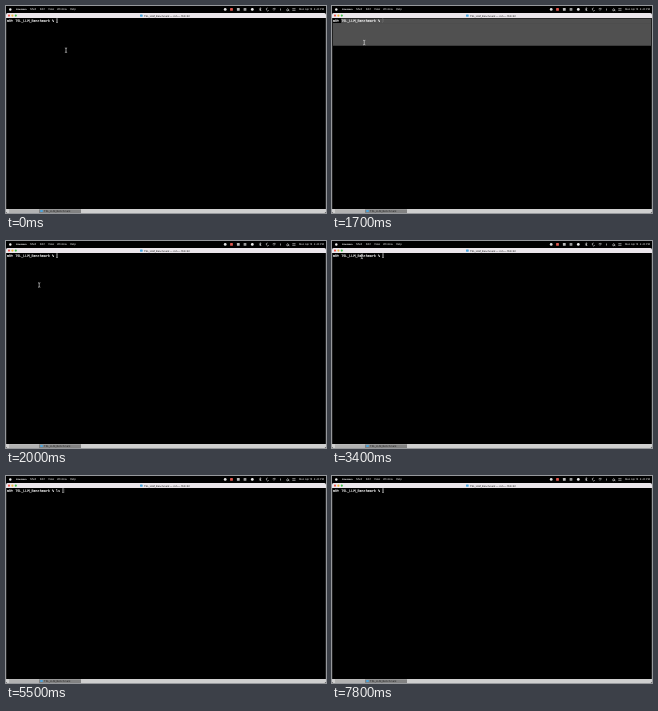
These frames come from a looping animation (320 by 207 pixels, 8000 ms). An HTML page:

```html
<!DOCTYPE html>
<html lang="en">
<head>
<meta charset="utf-8">
<title>Shell session</title>
<style>
  html, body { margin: 0; width: 100%; height: 100%; overflow: hidden; background: #000; }
  svg { display: block; width: 100%; height: 100%; }
  text { text-rendering: geometricPrecision; white-space: pre; }
  .ui { font-family: Inter, "Open Sans", sans-serif; font-size: 2.7px; fill: #eee; }
  .mono { font-family: "DejaVu Sans Mono", monospace; font-size: 3.405px; fill: #fff; stroke: #fff; stroke-width: .1; }
  .title { font-size: 2.45px; font-weight: 600; fill: #444; }
  .tab { font-size: 2.6px; fill: #222; }
</style>
</head>
<body>
<svg viewBox="0 0 320 207" preserveAspectRatio="none">
  <rect width="320" height="207" fill="#000"/>

  <g class="ui">
    <circle cx="4.3" cy="3.5" r="1.2"/>
    <text x="10" y="4.4" font-weight="700" font-size="2.3" fill="#fff">Lineroom</text>
    <text x="24" y="4.4">Shell</text>
    <text x="34" y="4.4">Edit</text>
    <text x="42" y="4.4">View</text>
    <text x="51" y="4.4" font-size="2.6">Window</text>
    <text x="64" y="4.4">Help</text>
    <text x="293" y="4.4" font-size="2.5">Mon Apr 13  4:40 PM</text>
  </g>
  <g id="status"></g>

  <path d="M0 12V8.6Q0 7 1.6 7H318.4Q320 7 320 8.6V12Z" fill="#ebe6eb"/>
  <circle cx="3" cy="9.6" r="1.05" fill="#f4564e"/>
  <circle cx="6.4" cy="9.6" r="1.05" fill="#f2b83a"/>
  <circle cx="9.8" cy="9.6" r="1.05" fill="#3fc04a"/>
  <rect x="134" y="8.5" width="2.7" height="2.2" rx=".4" fill="#4ba6df"/>
  <text class="ui title" x="138" y="10.5">TSL_LLM_Benchmark — zsh — 153×42</text>

  <g id="selection" fill="#505050"></g>
  <rect id="caret" y="12.8" width="1.5" height="4" fill="#333" stroke="#aaa" stroke-width=".4"/>
  <text id="line" class="mono" x="1" y="16"></text>

  <path d="M.3 12V203M319.7 12V203" stroke="#444" stroke-width=".6"/>
  <path d="M0 203H320V205.4Q320 207 318.4 207H1.6Q0 207 0 205.4Z" fill="#cfcfcf"/>
  <rect x="3" y="203.3" width="30" height="3.7" fill="#b2b2b2"/>
  <rect x="33" y="203.3" width="42" height="3.7" fill="#828282"/>
  <rect x="34.2" y="204" width="2.6" height="2" rx=".4" fill="#4ba6df"/>
  <text class="ui tab" x="38" y="206">TSL_LLM_Benchmark</text>

  <path id="mouse" d="M-1.1 -2.3Q0 -2.3 0 -1.5Q0 -2.3 1.1 -2.3M0 -1.5V1.5M-1.1 2.3Q0 2.3 0 1.5Q0 2.3 1.1 2.3"
        fill="none" stroke="#ddd" stroke-width=".65"/>
</svg>
<script>
const LOOP = 8000, STEP = 100;
const LEFT = 1, CHAR = 2.05, TOP = 12.5, ROW = 4.54;
const PROMPT = 'mRt TSL_LLM_Benchmark % ';
const WORD = { from: LEFT + 4 * CHAR, to: LEFT + 21 * CHAR };

// [time, x, y]: the pointer glides between neighbouring stops
const PATH = [
  [0, 60, 44.2], [100, 40.5, 21.5], [200, 40.5, 21.5], [1100, 33.5, 16.5],
  [1300, 29.5, 15.3], [1500, 29.5, 15.3], [1800, 33.2, 44], [2100, 33.2, 44],
  [2600, 39.6, 22], [3100, 39.6, 22], [3400, 29.8, 15.4], [4300, 29.8, 15.4],
  [4500, 42.4, 22.4], [5300, 42.4, 22.4]
];
// [time, typed text]
const TYPED = [[0, ''], [5300, 'ls'], [5500, 'ls '], [7600, 'ls'], [7700, 'l'], [7800, '']];

const $ = id => document.getElementById(id);
const rect = (x, y, w, h, more = '') =>
  `<rect x="${x}" y="${y}" width="${w}" height="${h}" ${more}/>`;

function drawStatus() {
  const dot = (x, fill) => `<circle cx="${x}" cy="3.4" r="1.4" fill="${fill}"/>`;
  const box = (x, fill) => rect(x - 1.4, 2.1, 2.8, 2.6, `rx=".5" fill="${fill}"`);
  const lines = d => `<path d="${d}" fill="none" stroke="#ddd" stroke-width=".6"/>`;
  $('status').innerHTML =
    dot(219.2, '#ddd') + box(225.5, '#e0584f') + box(232.3, '#bbb') +
    box(239, '#999') + dot(246.3, '#eee') +
    lines('M253.5 2.7L255 4.2L254.2 5V1.8L255 2.6L253.5 4.1') +
    lines('M261.6 2A1.4 1.4 0 1 0 262.8 4.3') +
    lines('M266.6 3Q268.2 1.7 269.8 3M267.4 4Q268.2 3.4 269 4') +
    lines('M274.5 2.5V4.5') +
    lines('M282.5 3.2A1 1 0 1 1 282.4 3.1M282.4 4L283.3 4.8') +
    lines('M286.3 2.7H289.5M286.3 4.3H289.5');
}

function pointerAt(t) {
  const i = PATH.findIndex(p => p[0] > t);
  if (i < 0) return PATH[PATH.length - 1].slice(1);
  const [t0, x0, y0] = PATH[i - 1], [t1, x1, y1] = PATH[i];
  const k = (t - t0) / (t1 - t0), e = k * k * (3 - 2 * k);
  return [x0 + (x1 - x0) * e, y0 + (y1 - y0) * e];
}

function selectionAt(t, y) {
  const word = rect(WORD.from, TOP, WORD.to - WORD.from, 4.4);
  if (t >= 4100 && t < 4700 || t >= 1300 && t < 1600) return word;
  if (t < 1600 || t >= 2000) return '';
  const rows = Math.ceil((y - TOP) / ROW);
  if (rows < 2) return word;
  return rect(WORD.from, TOP, 319 - WORD.from, ROW) +
    rect(1, TOP + ROW, 318, (rows - 1) * ROW);
}

function render(now) {
  const t = Math.floor(now % LOOP / STEP) * STEP;
  const [x, y] = pointerAt(t);
  const typed = TYPED.filter(s => s[0] <= t).pop()[1];
  $('line').textContent = PROMPT + typed;
  $('caret').setAttribute('x', LEFT + .1 + (PROMPT.length + typed.length) * CHAR);
  $('caret').setAttribute('opacity', t >= 1600 && t < 2000 ? .55 : 1);
  $('selection').innerHTML = selectionAt(t, y);
  $('mouse').setAttribute('transform', `translate(${x} ${y})`);
  $('mouse').setAttribute('visibility', t < 5300 ? 'visible' : 'hidden');
}

drawStatus();
let start;
function tick(now) {
  start ??= now;
  render(now - start);
  requestAnimationFrame(tick);
}
render(0);
requestAnimationFrame(tick);
</script>
</body>
</html>
```
